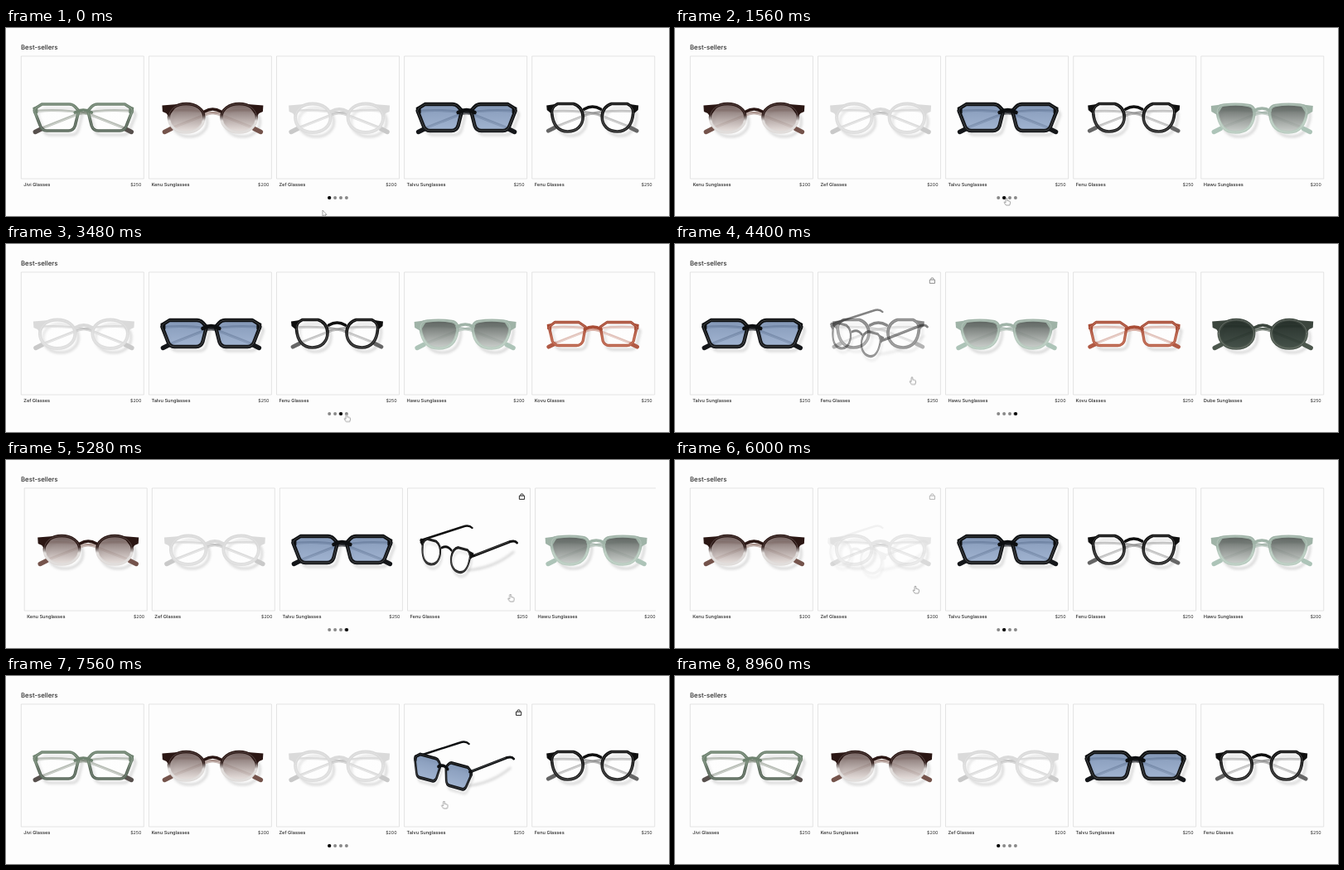
An HTML page for the animation above (9000 ms loop, 800x227 px).

```html
<!DOCTYPE html>
<html lang="en">
<head>
<meta charset="utf-8">
<title>Best-sellers</title>
<style>
@property --hover { syntax: "<number>"; inherits: true; initial-value: 0; }
html, body { margin: 0; width: 100%; height: 100%; overflow: hidden; background: #fdfdfd; }
svg { display: block; width: 800px; height: 227px; font: 500 5.65px Inter, "Open Sans", sans-serif; text-rendering: geometricPrecision; }
text { fill: #2a2a2a; }
.title { font-size: 7.8px; }
.price { font-size: 5.3px; font-weight: 400; text-anchor: end; }
.card { fill: #fdfdfd; stroke: #d8d8d8; stroke-width: .7; }
.line { fill: none; stroke-linecap: round; stroke-linejoin: round; }
.front { opacity: calc(1 - var(--hover)); }
.turned { opacity: var(--hover); }
.bag { fill: none; stroke: #111; stroke-width: .9; opacity: calc(var(--hover) * 3); }

#track { animation: track 9s infinite cubic-bezier(.25, 1, .5, 1); }
#active { animation: active 9s infinite step-end; }
#cursor { animation: cursor 9s infinite ease-in-out; }
#pointer { fill: #fff; stroke: #777; stroke-width: .65; stroke-linejoin: round; animation: pointer 9s infinite step-end; }
#card2 { animation: hover2 9s infinite linear; }
#card3 { animation: hover3 9s infinite linear; }
#card4 { animation: hover4 9s infinite linear; }

@keyframes track {
  0%, 11.2% { transform: translateX(0); }
  18.2%, 27% { transform: translateX(-154.1px); }
  34%, 39.4% { transform: translateX(-308.2px); }
  45.6% { transform: translateX(-462.3px); }
  52.7% { transform: translateX(-462.3px); animation-timing-function: ease-in-out; }
  58.6%, 60% { transform: translateX(-150.2px); }
  64% { transform: translateX(-154.1px); }
  68.9% { transform: translateX(-154.1px); animation-timing-function: ease-in-out; }
  75.5%, 76.4% { transform: translateX(47.4px); }
  83.3%, 100% { transform: translateX(0); }
}
@keyframes active {
  0%, 76.6% { transform: translateX(0); }
  11.4%, 60% { transform: translateX(6.9px); }
  27.2% { transform: translateX(13.8px); }
  39.6% { transform: translateX(20.7px); }
}
@keyframes cursor {
  0% { transform: translate(382px, 220px); }
  8.9%, 25.3% { transform: translate(400px, 205px); }
  26.7%, 35.5% { transform: translate(404px, 205px); }
  37.8%, 45.7% { transform: translate(411px, 205.5px); }
  48.4%, 52.7% { transform: translate(286px, 160.5px); }
  58.6%, 61.1% { transform: translate(608.6px, 162px); }
  66.5%, 68.9% { transform: translate(290px, 152px); }
  75.5%, 86.7% { transform: translate(528.5px, 151px); }
  95%, 100% { transform: translate(420px, 231px); }
}
@keyframes pointer {
  0%, 46.2%, 73.5%, 88% { d: path("M0 0V7.3L1.7 5.9 2.9 8.4 4 7.9 2.9 5.4H5Z"); }
  8.5%, 47.2%, 77.5% { d: path("M-.9 .8Q0 -.6 .9 .8V3.4L4 4.2Q4.8 4.6 4.6 6L3.8 9H-.6L-3 5.6Q-2.6 4.4 -.9 5.8Z"); }
}
@keyframes hover2 {
  0%, 65.6% { --hover: 0; }
  68.8%, 76.6% { --hover: 1; }
  79.8%, 100% { --hover: 0; }
}
@keyframes hover3 {
  0%, 77.6% { --hover: 0; }
  80.8%, 87.5% { --hover: 1; }
  90.7%, 100% { --hover: 0; }
}
@keyframes hover4 {
  0%, 47.2% { --hover: 0; }
  50.5%, 63.2% { --hover: 1; }
  66.2%, 100% { --hover: 0; }
}
</style>
</head>
<body>
<svg viewBox="0 0 800 227">
  <defs>
    <clipPath id="window"><path d="M17.6 30H783.4V200H17.6Z"/></clipPath>
    <filter id="soft" x="-30%" y="-50%" width="160%" height="200%"><feGaussianBlur stdDeviation="1.6"/></filter>
  </defs>
  <text class="title" x="18" y="25.6">Best-sellers</text>
  <g clip-path="url(#window)"><g id="track"></g></g>
  <g fill="#888">
    <circle cx="390.2" cy="205" r="2"/><circle cx="397.1" cy="205" r="2"/>
    <circle cx="404" cy="205" r="2"/><circle cx="410.9" cy="205" r="2"/>
  </g>
  <circle id="active" cx="390.2" cy="205" r="2.1"/>
  <g id="cursor"><path id="pointer" d="M0 0V7.3L1.7 5.9 2.9 8.4 4 7.9 2.9 5.4H5Z"/></g>
</svg>
<script>
// Left halves, measured from the middle of the bridge: rim, hinge piece, bridge height, arm size.
const rims = {
  hex: { d: "M-59 -8L-58 -11L-50 -16H-17Q-13 -16 -10 -13L-5.5 -8L-10 10Q-12 16 -18 16H-44Q-50 16 -52 10Z",
    hinge: "M-61 -12L-55 -14L-55 -5L-60 -5Z", bridge: -9, size: 1 },
  round: { d: "M-53 0C-53 -10 -44 -16.5 -32 -16.5C-20 -16.5 -10.5 -10 -10.5 0C-10.5 11 -20 18 -32 18C-44 18 -53 11 -53 0Z",
    hinge: "M-61 -14.5L-42 -16L-53 -1L-56 -5L-60.5 -7Z", bridge: -10, size: 1 },
  octo: { d: "M-49 -5Q-50 -10 -46 -14L-42 -16.5H-23Q-12 -13 -11.5 -1C-11.5 10 -19 17 -30 17C-41 17 -48 9 -49 -5Z",
    hinge: "M-55.5 -14.5L-45 -16L-49 -4L-55 -9Z", bridge: -13, size: .92 },
  square: { d: "M-54 -6Q-55 -14 -46 -15Q-30 -17 -16 -14.5Q-8 -13 -9.5 -3Q-12 18 -32 18Q-51 18 -54 -6Z",
    hinge: "M-61.5 -14L-46 -16L-54 -3L-61 -7Z", bridge: -11, size: 1 },
  slim: { d: "M-53 -8L-46 -13.5H-17L-9 -8L-12 9Q-14 14.5 -20 14.5H-41Q-47 14.5 -49 9Z",
    hinge: "M-55.5 -11L-50 -12L-50 -4L-55 -5Z", bridge: -8, size: .92 }
};
const clear = ["#fff5", "#fff5"];
const items = [
  { name: "Jivi Glasses", price: 250, rim: "hex", mid: 75, frame: ["#6f8370", "#59685a"], lens: clear, tip: "#57504d", arm: "#7c8679", width: 3.6 },
  { name: "Kenu Sunglasses", price: 200, rim: "round", mid: 77, frame: ["#2b1714", "#dedad8"], lens: ["#5d4845e0", "#e6dddad0"], tip: "#75544c", arm: "#a58c85", width: 3.4 },
  { name: "Zef Glasses", price: 200, rim: "round", mid: 75.6, frame: ["#dadada", "#dedede"], lens: clear, tip: "#c9c9c9", arm: "#c0c0c0", width: 4 },
  { name: "Talvu Sunglasses", price: 250, rim: "hex", mid: 75, frame: ["#0d0f11", "#15171a"], lens: ["#6f87acd8", "#93a9cbd8"], tip: "#15171a", arm: "#22252a", width: 4.4 },
  { name: "Fenu Glasses", price: 250, rim: "octo", mid: 73, frame: ["#0f0f0f", "#242424"], lens: clear, tip: "#666", arm: "#8c8c8c", width: 3.6 },
  { name: "Hawu Sunglasses", price: 200, rim: "square", mid: 73.5, frame: ["#9fb3a7", "#b7cabe"], lens: ["#4c534ff0", "#c3c8c4d8"], tip: "#adc4b8", arm: "#a2b3a9", width: 3.4 },
  { name: "Kovu Glasses", price: 250, rim: "slim", mid: 73.5, frame: ["#a94c35", "#b85c43"], lens: clear, tip: "#b05a45", arm: "#c98d7d", width: 3.3 },
  { name: "Dube Sunglasses", price: 250, rim: "round", mid: 74.5, frame: ["#3c463e", "#4a554b"], lens: ["#1d2721f5", "#3a473ff0"], tip: "#4c574d", arm: "#4c574d", width: 3.4 }
];

const line = (d, color, width, more = "") =>
  `<path class="line" d="${d}" stroke="${color}" stroke-width="${width}" ${more}/>`;
const both = part => part + `<g transform="scale(-1 1)">${part}</g>`;

function gradient(id, [top, bottom], from, to) {
  return `<linearGradient id="${id}" gradientUnits="userSpaceOnUse" x1="0" y1="-17" x2="0" y2="18">
    <stop offset="${from}" stop-color="${top}"/><stop offset="${to}" stop-color="${bottom}"/></linearGradient>`;
}

function rimPair(item, i) {
  const { d, hinge, bridge } = rims[item.rim];
  const paint = `url(#frame${i})`;
  return both(`<path d="${d}" fill="url(#lens${i})"/><path d="${hinge}" fill="${paint}"/>`
    + line(d, paint, item.width) + line(d, "#fff", 1, 'opacity=".2"'))
    + line(`M-10 ${bridge + 3}Q0 ${bridge - 3} 10 ${bridge + 3}`, item.frame[0], item.width);
}

function shadow(item) {
  return `<g filter="url(#soft)" opacity=".22" transform="translate(4 5)">
    ${both(line(rims[item.rim].d, "#555", 3))}</g>`;
}

function frontView(item, i) {
  const arms = both(line("M55 -8Q20 -10 -7 -4L-50 13", item.arm, 3.2, 'opacity=".8"')
    + line("M53 -7.5Q20 -9 -8 -3L-46 12", "#fff", .8, 'opacity=".45"')
    + line("M-50 13.5L-58 17.5", item.tip, 5.4));
  return `<g class="front"><g transform="translate(${item.mid} 108)">
    ${shadow(item)}<g transform="scale(${rims[item.rim].size})">${arms}</g>${rimPair(item, i)}</g></g>`;
}

function turnedView(item, i) {
  const color = item.frame[0];
  return `<g class="turned">
    ${line("M72 133Q104 131 128 111", "#777", 2.5, 'opacity=".3" filter="url(#soft)"')}
    ${line("M16 97L67 80.5Q74 78 78 82", color, 2.4)}
    <g transform="matrix(.58 .16 -.12 .85 46 116)">${shadow(item)}${rimPair(item, i)}</g>
    ${line("M79 116L124 98.5Q130 97 132 100", color, 3)}
    ${line("M82 114.5L122 99", "#fff", .6, 'opacity=".4"')}
    <g class="bag"><path d="M134.9 43.2H141.1V47.4H134.9Z"/><path d="M136.4 43V42.2Q136.4 40.8 138 40.8T139.6 42.2V43"/></g>
  </g>`;
}

function card(item, i) {
  return `<g id="card${i}"><g transform="translate(${18.3 + i * 154.1} 0)">
    ${gradient("frame" + i, item.frame, .4, .6)}${gradient("lens" + i, item.lens, 0, 1)}
    <path class="card" d="M0 34H148V182H0Z"/>
    ${frontView(item, i)}${i > 1 && i < 5 ? turnedView(item, i) : ""}
    <text x="3" y="190.5">${item.name}</text>
    <text class="price" x="145" y="190.5">$${item.price}</text>
  </g></g>`;
}

document.getElementById("track").innerHTML = items.map(card).join("");
</script>
</body>
</html>
```
